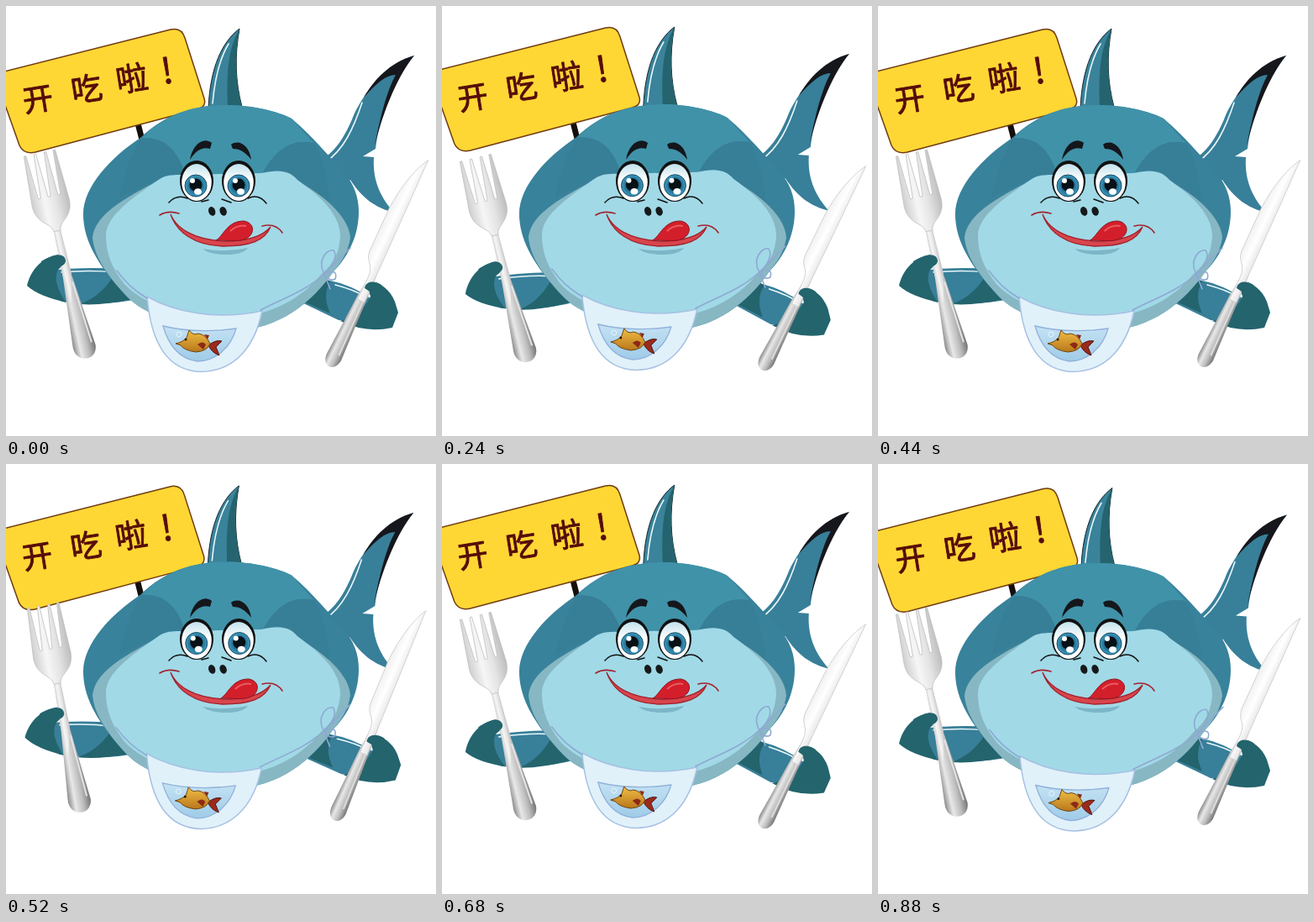
These frames come from a looping animation (512x512 px, 0.92 s). An HTML page:

```html
<!DOCTYPE html>
<html lang="zh">
<head>
<meta charset="utf-8">
<style>
html, body { margin: 0; width: 100%; height: 100%; overflow: hidden; background: #fff; }
svg { display: block; width: 100vw; height: 100vh; }
text { font: 500 34px "Noto Sans CJK SC", "Noto Sans CJK", sans-serif; fill: #560d0a; stroke: #560d0a; stroke-width: .9; stroke-linejoin: round; text-anchor: middle; }
.line { fill: none; stroke: #111; stroke-width: 1.5; stroke-linecap: round; }
.lip { fill: none; stroke: #a3222c; stroke-width: 1.6; stroke-linecap: round; }
.strap { fill: none; stroke: #8ea9d2; stroke-width: 1.6; stroke-linecap: round; }
.shine { fill: none; stroke: #eaf8fb; stroke-width: 1.6; stroke-linecap: round; }
.skin { fill: #387f99; }
.dark { fill: #23646d; }
</style>
</head>
<body>
<svg viewBox="0 0 512 512">
  <defs>
    <linearGradient id="steel">
      <stop offset="0" stop-color="#cfcfcf"/><stop offset=".35" stop-color="#f6f6f6"/>
      <stop offset=".65" stop-color="#e4e4e4"/><stop offset="1" stop-color="#bdbdbd"/>
    </linearGradient>
    <linearGradient id="grip">
      <stop offset="0" stop-color="#8a8a8a"/><stop offset=".3" stop-color="#e8e8e8"/>
      <stop offset=".65" stop-color="#bcbcbc"/><stop offset="1" stop-color="#747474"/>
    </linearGradient>
    <linearGradient id="blade">
      <stop offset="0" stop-color="#f1f1f1"/><stop offset=".5" stop-color="#fff"/>
      <stop offset="1" stop-color="#e6e6e6"/>
    </linearGradient>
    <linearGradient id="gold" x2="0" y2="1">
      <stop offset="0" stop-color="#f0bd45"/><stop offset="1" stop-color="#b9771b"/>
    </linearGradient>
    <linearGradient id="water" x2="0" y2="1">
      <stop offset="0" stop-color="#c4e2f3"/><stop offset="1" stop-color="#9fcbe8"/>
    </linearGradient>
    <radialGradient id="iris">
      <stop offset=".4" stop-color="#175a7c"/><stop offset="1" stop-color="#3f9cc0"/>
    </radialGradient>
    <linearGradient id="white" x2="0" y2="1">
      <stop offset="0" stop-color="#c3e2ec"/><stop offset=".45" stop-color="#fff"/>
    </linearGradient>
    <g id="eye">
      <ellipse cy="-.5" rx="20" ry="24.5" fill="#111"/>
      <ellipse cy="1" rx="17.8" ry="22" fill="url(#white)"/>
    </g>
    <g id="pupil">
      <circle r="13" fill="url(#iris)" stroke="#174a63"/>
      <circle cy="-1" r="7.5" fill="#071116"/>
      <circle cx="-4" cy="-6" r="3" fill="#fff"/>
      <ellipse cx="2.5" cy="7" rx="4.5" ry="3.8" fill="#fff"/>
    </g>
  </defs>

  <g class="sway">
    <path d="M154 128L166 175" stroke="#15100e" stroke-width="7"/>
    <path d="M-14 81L196 28Q209 25 213 38L236 110Q239 120 228 123L35 174Q21 177 16 166Z" fill="#ffd734" stroke="#6f3c12" stroke-width="1.5"/>
    <g id="sign"></g>
    <path d="M278 27C258 42 243 72 241 122L281 120C273 90 272 60 278 27Z" fill="#3a839b" stroke="#16242a"/>
    <path d="M278 27C262 55 263 90 264 121L281 120C273 90 272 60 278 27Z" fill="#25646f"/>
    <path d="M265 45Q250 70 246 116" class="shine" stroke-width="2.5"/>
    <path d="M486 59C455 68 428 100 414 130C404 155 392 175 372 185L396 214L410 207C425 230 440 240 462 246C448 230 436 210 438 180L425 179L440 170C445 130 460 90 486 59Z" class="skin"/>
    <path d="M486 59C457 67 438 88 426 109C440 93 452 82 464 82C453 102 445 135 439 167C447 133 463 88 486 59Z" fill="#15171c"/>
    <path d="M424 115C414 145 402 172 380 186" class="shine" stroke-width="2.4"/>
  </g>

  <g id="armL">
    <path d="M50 315Q95 310 134 313L160 348Q120 358 66 352Z" class="skin"/>
    <path d="M132 313L160 346L150 349Q115 357 88 355Q118 344 132 313Z" class="dark"/>
    <path d="M66 317Q100 314 128 317" class="shine"/>
    <path d="M25 333C30 312 45 299 62 296C72 296 72 308 64 312C57 318 58 335 72 353C50 348 35 342 25 333Z" class="dark"/>
  </g>
  <g id="fork">
    <path d="M-4-45L-4.500 10L-11 100C-13 122 15 124 16 104L5 10L4-45Z" fill="url(#grip)"/>
    <path d="M-4-45L-5 15L-2 50L6 15L4-45Z" fill="url(#steel)"/>
    <path d="M-20-133L-23-72C-22-50-5-50-4-38H4C5-50 22-50 22-72L18-133H15.500L13-80H10L7-133H4.500L1-80H-2L-5.500-133H-8L-11-80H-14L-17.500-133Z" fill="url(#steel)" stroke="#bcbcbc" stroke-width=".7"/>
    <path d="M5 25L12 100" fill="none" stroke="#e4e4e4" stroke-width="2"/>
  </g>
  <path id="fingerL" d="M42 304C54 297 69 292 71 303C71 311 60 309 57 319L45 322Z" class="dark"/>

  <g id="armR">
    <path d="M365 318L382 326Q412 332 434 348L426 378L396 374L350 352Z" class="skin"/>
    <path d="M365 318L386 328Q376 345 386 366L350 350Z" class="dark"/>
    <path d="M392 332Q415 338 430 347" class="shine"/>
    <path d="M430 332C438 325 456 334 463 352L467 365L460 383Q428 390 398 375Q424 368 434 346Z" class="dark"/>
  </g>
  <g id="knife">
    <path d="M-3-12L-6 20L-9 98C-9 116 9 116 10 99L6 20L4-12Z" fill="url(#grip)"/>
    <path d="M0-161C-11-142-17-110-17-85L-16-33C-14-18-5-22-4-5L-4 25H5L4-10L2-90Z" fill="url(#blade)" stroke="#cdcdcd" stroke-width=".8"/>
    <path d="M3 25L5 95" stroke="#ddd" stroke-width="2"/>
  </g>
  <path id="fingerR" d="M427 336C428 328 438 326 447 332L458 345L440 352Q438 342 427 336Z" class="dark"/>

  <g id="head">
    <path d="M92 248C92 215 125 180 160 157C190 128 225 118 262 118C295 118 325 126 340 134C365 155 385 180 400 195C415 212 420 228 420 245C420 275 406 300 390 316C365 352 325 386 270 386C215 386 165 368 144 346C105 305 92 275 92 248Z" fill="#39829b"/>
    <path d="M162 157C190 128 225 118 262 118C295 118 325 126 340 134L366 163C340 158 320 170 305 202H212C205 172 190 156 162 157Z" fill="#4092a9"/>
    <path d="M162 157C190 156 205 172 214 202H190L135 228Q145 180 162 157ZM366 163C340 158 320 170 304 202H330L385 235Q382 190 366 163Z" fill="#377e97"/>
    <path d="M103 276C106 245 150 225 190 203L330 200C370 218 408 247 410 276C407 295 398 306 390 316C365 352 325 386 270 386C215 386 165 368 144 346C115 315 105 295 103 276Z" fill="#87b7c3"/>
    <path id="belly" d="M119 273C119 252 145 232 183 206C192 200 204 201 214 201L304 199C325 194 338 196 347 207C375 227 398 248 398 275C396 300 386 310 375 320C350 350 310 372 256 372C215 372 165 357 141 331C126 312 119 295 119 273Z" fill="#a1d9e7"/>
  </g>

  <g class="sway">
    <path d="M168 346C200 364 250 375 305 363C297 402 275 435 232 435.500C182 434 171 382 168 346Z" fill="#e0f1fa" stroke="#a7c1e2" stroke-width="1.5"/>
    <path d="M187 381C216 388 245 388 274 384C268 406 250 423 228 423C205 420 193 402 187 381Z" fill="url(#water)" stroke="#91b1da" stroke-width="1.3"/>
    <path d="M241 404Q250 397 257 399L250 406L254 416Q245 413 241 404Z" fill="#9b2a1d" stroke="#521512"/>
    <path d="M202 402Q211 400 215 395L218 386Q223 393 229 390Q238 391 243 402Q240 411 226 412Q212 410 208 404Z" fill="url(#gold)" stroke="#6f4511"/>
    <path d="M228 403Q234 398 238 403L235 409ZM236 391L242 392L240 397Z" fill="#8c2a16"/>
    <circle cx="214" cy="397" r="1.500" fill="#2a1708"/>
    <circle cx="206" cy="391" r="3" fill="none" stroke="#e8f6ff"/>
    <path class="strap" d="M132 315Q146 335 168 348M303 362C332 347 356 340 379 319M379 319C370 303 382 289 390 291C396 298 387 313 379 319L410 288M379 319Q396 312 392 325Q385 329 379 319L386 337"/>
  </g>

  <path d="M219 183C222 165 235 155 245 163L243 170C234 167 226 172 219 183ZM268 165C278 158 290 167 292 183C285 174 279 170 270 170Z" fill="#14171b"/>
  <use href="#eye" x="227" y="209"/>
  <use href="#eye" x="277" y="209"/>
  <g id="gaze"><use href="#pupil" x="226" y="214"/><use href="#pupil" x="277" y="214"/></g>
  <path class="line" d="M194 234Q203 224 216 229M233 233L241 231M257 230L268 234M288 229Q301 223 310 235"/>
  <ellipse cx="245" cy="244.500" rx="4" ry="5.500" transform="rotate(-20 245 244)" fill="#16191b"/>
  <ellipse cx="258.500" cy="244.500" rx="4" ry="5.500" transform="rotate(-20 258 244)" fill="#16191b"/>
  <path d="M234 289Q262 294 288 288Q282 296 262 296Q242 296 234 289Z" fill="#7cb6c7"/>
  <path d="M196 248C203 265 223 278 260 280C288 280 306 274 315 263C308 280 290 286 258 286C224 285 203 269 196 248Z" fill="#d8454c" stroke="#a3222c" stroke-width="1.300"/>
  <g id="tongue">
    <path d="M251 279C260 274 264 256 284 256C297 258 298 271 287 277C276 282 263 278 251 279Z" fill="#d31f2b" stroke="#8e1620"/>
    <path d="M268 268Q277 260 287 262" fill="none" stroke="#ec5b60" stroke-width="2"/>
  </g>
  <path class="lip" d="M183 249Q193 243 206 247M305 262Q321 258 329 270"/>
</svg>
<script>
const $ = id => document.getElementById(id);
const sways = document.querySelectorAll('.sway');
const LOOP = 920, CYCLE = 440, STEP = 40;

[['开', 40, 124, 36], ['吃', 98, 112, 37], ['啦', 152, 100, 38], ['!', 194, 92, 42]].forEach(([char, x, y, size]) => {
  $('sign').insertAdjacentHTML('beforeend',
    `<text transform="translate(${x} ${y}) rotate(-9)" style="font-size:${size}px">${char}</text>`);
});

// Linear interpolation over key times.
function track(t, times, values) {
  let i = 1;
  while (i < times.length - 1 && t > times[i]) i++;
  const k = (t - times[i - 1]) / (times[i] - times[i - 1]);
  return values[i - 1] + (values[i] - values[i - 1]) * k;
}

const move = (node, value) => node.setAttribute('transform', value);

function draw(now) {
  const t = Math.floor(now % LOOP / STEP) * STEP;
  const swing = (...values) => track(t % CYCLE, [0, 160, 240, 320, CYCLE], [...values, values[0]]);

  const turn = swing(0, 3, -3, -4), spread = swing(0, 5, -2.5, -5), drop = swing(0, -8, 3.5, 5);
  for (const id of ['armL', 'fingerL']) move($(id), `translate(${-spread} ${drop}) rotate(${turn} 150 330)`);
  for (const id of ['armR', 'fingerR']) move($(id), `translate(${spread} ${drop}) rotate(${-turn} 365 335)`);

  move($('fork'), `translate(${69 + swing(0, -3, 3, 5)} ${305 + swing(0, -12, 5, 11)}) rotate(${swing(0, 5, -1.4, -2.3) - 12.2})`);
  move($('knife'), `translate(${433 + swing(0, 4.6, -1.6, -3.7)} ${328.5 + swing(0, -13, 5.4, 10.5)}) rotate(${swing(0, -4, 1.4, 3) + 25.7})`);

  const lift = swing(0, 1, .3, 0);
  move($('head'), `translate(0 ${-4.4 * lift}) scale(1 ${1 + .0115 * lift})`);
  move($('belly'), `translate(0 ${-4 * lift}) scale(1 ${1 + .0105 * lift})`);
  move($('gaze'), `translate(${1.5 * lift} ${-lift})`);

  const bob = track(t, [0, 160, 240, 320, 440, 600, 680, 760, 880], [0, -2.2, -2, 1, 0, -2.2, -2, 1, 1.5]);
  sways.forEach(node => move(node, `translate(${.6 * bob} ${bob})`));

  move($('tongue'), `translate(${track(t, [0, 320, 440, 600, 680, 880], [-1, 0, 1.5, 8, 0, -1])} 0)`);
  requestAnimationFrame(draw);
}
requestAnimationFrame(draw);
</script>
</body>
</html>
```
